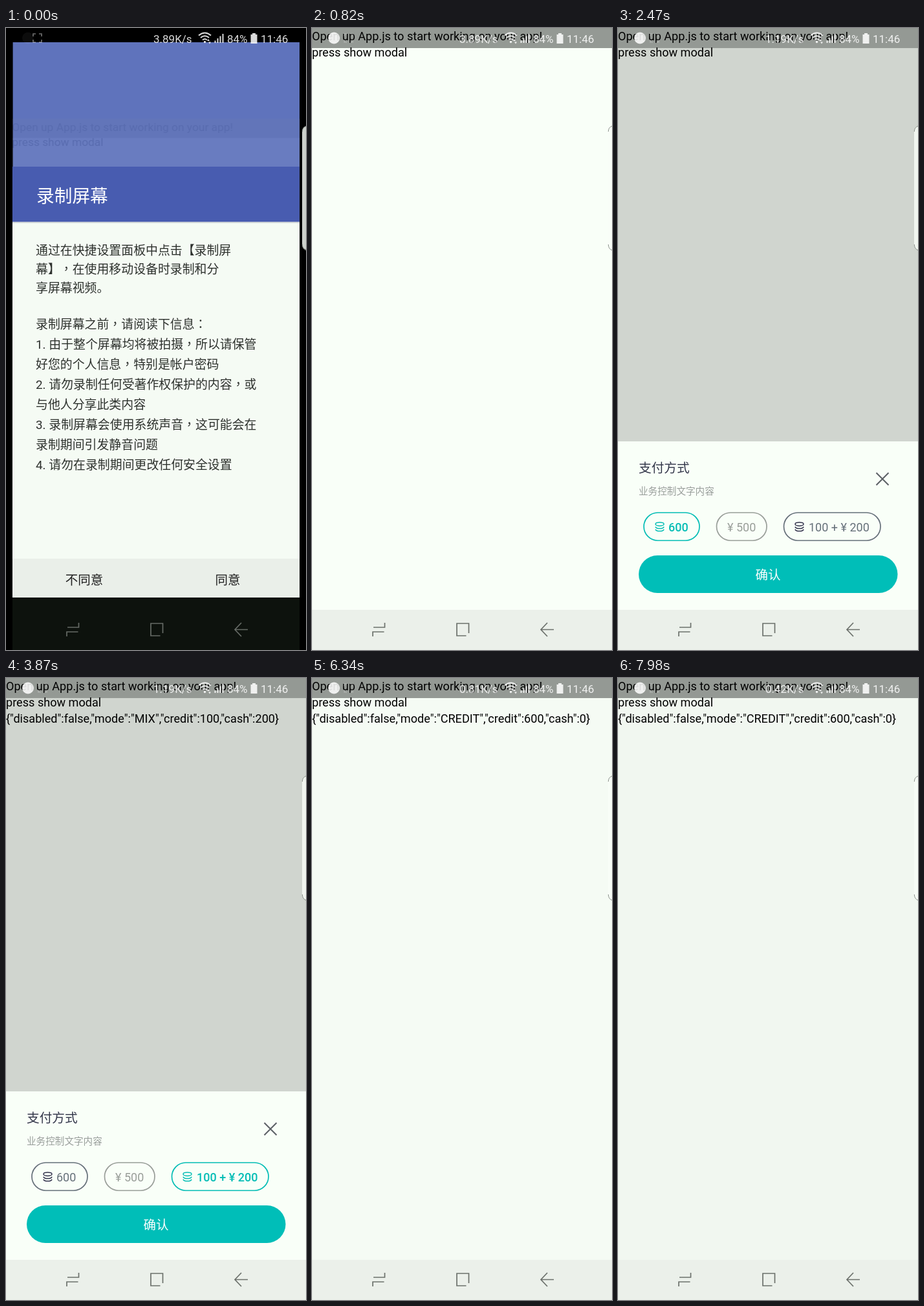
An HTML page for the animation above (8 s loop, 464 by 960 pixels).

```html
<!DOCTYPE html>
<html lang="zh-CN">
<head>
<meta charset="utf-8">
<style>
html, body { margin: 0; width: 100%; height: 100%; overflow: hidden; background: #000; }
svg { display: block; width: 464px; height: 960px; }
text { font-family: Roboto, "Noto Sans CJK SC", "Noto Sans CJK", sans-serif; white-space: pre; }
.line { fill: none; stroke-width: 1.7; }
.app { font-size: 18.1px; }
.status { font-size: 17px; fill: #fff; }
.body { font-size: 18.9px; fill: #1f231f; text-spacing-trim: space-all; font-feature-settings: "chws" 0, "halt" 0; }
.comma { font-family: "Noto Sans CJK TC", "Noto Sans CJK", sans-serif; }
.chip text { font-size: 18px; stroke: none; fill: currentColor; }
.chip { stroke: currentColor; color: #66707a; --icon: #30304a; }
.chip.off { color: #999e99; }
.chip.on { color: #04bdb5; --icon: #04bdb5; }
.chip.on text { font-weight: 500; }
.coins { stroke: var(--icon); stroke-width: 1.5; }
</style>
</head>
<body>
<svg viewBox="0 0 464 960">
  <defs>
    <g id="keys" class="line">
      <path d="M95 925H112.500V918M94 939V932H111.500"/>
      <path d="M242.500 934V919H224V938H238.500"/>
      <path d="M374 928.500H354.500M364 918L354 928.500L364 939"/>
    </g>
    <g id="coins" class="line coins">
      <ellipse cx="7.500" cy="3.200" rx="6.500" ry="2.700"/>
      <path d="M1 7.200C2 11 13 11 14 7.200M1 11.200C2 15 13 15 14 11.200"/>
    </g>
  </defs>
  <rect width="464" height="960"/>

  <g id="consent">
    <rect x="10.600" y="22" width="443.400" height="192" fill="#5f73bc"/>
    <rect x="10" y="214" width="444" height="86" fill="#3b51ab"/>
    <rect x="10" y="300" width="444" height="520" fill="#f5fbf4"/>
    <rect x="10" y="299" width="444" height="2" fill="#c6ccd2"/>
    <rect x="10" y="819" width="444" height="60" fill="#e9eee8"/>
    <text x="47" y="268.500" font-size="27.700" fill="#fff">录制屏幕</text>
    <g id="terms"></g>
    <g font-size="19.500" text-anchor="middle" fill="#111">
      <text x="121" y="858.500">不同意</text>
      <text x="343" y="858.500">同意</text>
    </g>
  </g>

  <g id="app">
    <rect width="464" height="960" fill="#f9fff8"/>
    <rect id="dim" y="31" width="464" height="867" fill="#000"/>
    <rect width="464" height="31" fill="#949994"/>
    <text class="app" x="0" y="19.300">Open up App.js to start working on your app!</text>
    <text class="app" x="0" y="44" id="link">press show modal</text>
    <text class="app" x="0" y="68.500" id="json"></text>
    <g id="sheet">
      <rect y="638" width="464" height="262" fill="#f9fff8"/>
      <text x="32" y="686" font-size="19.700" fill="#33364a">支付方式</text>
      <text x="32" y="720" font-size="14.600" fill="#999e9b">业务控制文字内容</text>
      <path class="line" d="M399.500 686.500L418.500 705.500M418.500 686.500L399.500 705.500" stroke="#5c6066" style="stroke-width:2"/>
      <g class="chip" id="credit">
        <rect class="line" x="40" y="748" width="86" height="43" rx="21.500"/>
        <use href="#coins" x="57" y="762.500"/>
        <text x="78" y="777">600</text>
      </g>
      <g class="chip off">
        <rect class="line" x="152.500" y="748" width="77.500" height="43" rx="21.500"/>
        <text x="169" y="777">¥ 500</text>
      </g>
      <g class="chip" id="mix">
        <rect class="line" x="256.500" y="748" width="149.500" height="43" rx="21.500"/>
        <use href="#coins" x="273" y="762.500"/>
        <text x="295" y="777">100 + ¥ 200</text>
      </g>
      <g id="confirm">
        <rect x="32" y="814" width="400.500" height="58" rx="29" fill="#00beb8"/>
        <text x="232" y="850.500" font-size="19.500" text-anchor="middle" fill="#fff">确认</text>
      </g>
    </g>
  </g>

  <g id="darkNav">
    <rect y="879" width="464" height="81"/>
    <rect x="10" y="879" width="444" height="81" fill="#0d120d"/>
    <use href="#keys" stroke="#666b66"/>
  </g>
  <g id="lightNav">
    <rect y="898" width="464" height="62" fill="#ebf0ea"/>
    <use href="#keys" stroke="#6c716c"/>
  </g>

  <g opacity=".86">
    <circle id="badge" cx="34" cy="15.500" r="9" fill="#fff"/>
    <path id="corners" class="line" stroke="#fff" d="M42 13V9H46M51 9H55V13M55 18V22H51M46 22H42V18"/>
    <text class="status" x="228" y="22.500" id="speed"></text>
    <g class="line" stroke="#fff" style="stroke-width:2">
      <path d="M298 11.500Q307.500 3.500 317 11.500M301 15Q307.500 9.500 314 15M304 18.500Q307.500 15.500 311 18.500"/>
      <path d="M323.500 23V19.500M327.500 23V16M331.500 23V12.500M335.500 23V9"/>
    </g>
    <circle cx="307.500" cy="21.500" r="1.700" fill="#fff"/>
    <path d="M311 20l2-3 2 3zM313 21.500h4l-2 3z" fill="#fff"/>
    <text class="status" x="342" y="22.500">84%</text>
    <path d="M381 8h5v2h2.500v14h-10V10h2.500z" fill="#fff"/>
    <text class="status" x="394" y="22.500">11:46</text>
  </g>

  <path d="M470 151Q458 151 458 161V333Q458 343 470 343Z" fill="#f9fef8" opacity=".82"/>
  <path class="line" d="M464 151.500Q458.500 153 458.300 160M464 343Q458.500 341 458.300 334" stroke="#8d938d" style="stroke-width:1"/>
  <circle id="finger" r="14.500" fill="#dfe3ec" fill-opacity=".45" stroke="#bcc4da" stroke-width="2"/>
</svg>
<script>
const LOOP = 8000;
const $ = id => document.getElementById(id);
const clamp = v => Math.max(0, Math.min(1, v));
const progress = (t, start, length) => clamp((t - start) / length);
const easeOut = p => 1 - (1 - p) ** 2;
const easeInOut = p => p < .5 ? 2 * p * p : 1 - 2 * (1 - p) ** 2;
const fade = (id, value) => $(id).setAttribute('opacity', value.toFixed(3));
const write = (id, value) => { if ($(id).textContent !== value) $(id).textContent = value; };

const terms = [
  [350, '通过在快捷设置面板中点击【录制屏'],
  [379, '幕】，在使用移动设备时录制和分'],
  [408, '享屏幕视频。'],
  [464, '录制屏幕之前，请阅读下信息：'],
  ...['1. 由于整个屏幕均将被拍摄，所以请保管', '好您的个人信息，特别是帐户密码',
    '2. 请勿录制任何受著作权保护的内容，或', '与他人分享此类内容',
    '3. 录制屏幕会使用系统声音，这可能会在', '录制期间引发静音问题',
    '4. 请勿在录制期间更改任何安全设置'].map((s, i) => [495 + 31 * i, s])
];
// Commas and colons sit centred in their cell, as in traditional typesetting.
const centreMarks = s => s.replace(/[，：]/g, '<tspan class="comma" lang="zh-TW">$&</tspan>');
$('terms').innerHTML = terms
  .map(([y, s]) => `<text class="body" x="46" y="${y}">${centreMarks(s)}</text>`).join('');

const touches = [
  { from: 1770, to: 2030, x: 55, y: 52, on: 'link' },
  { from: 3360, to: 3560, x: 330, y: 770, on: 'mix' },
  { from: 4820, to: 5100, x: 82, y: 770, on: 'credit' },
  { from: 5830, to: 6050, x: 232, y: 843, on: 'confirm' },
  { from: 7300, to: 7740, x: 55, y: 52, on: 'link' }
];
const MIX_AT = 3590, CREDIT_AT = 5130;
const OPEN_AT = 2150, CLOSE_AT = 6110, REOPEN_AT = 7885, SLIDE = 300;

const payload = (mode, credit, cash) => JSON.stringify({ disabled: false, mode, credit, cash });

function drawTouches(t) {
  const dimmed = { link: 0, mix: 0, credit: 0, confirm: 0 };
  for (const { from, to, on } of touches) {
    const press = progress(t, from, 120) * (1 - progress(t, to, 180));
    dimmed[on] = Math.max(dimmed[on], press);
  }
  for (const id in dimmed) fade(id, 1 - .78 * dimmed[id]);

  const active = touches.find(k => t >= k.from && t < k.to);
  fade('finger', active ? 1 : 0);
  if (active) {
    $('finger').setAttribute('cx', active.x);
    $('finger').setAttribute('cy', active.y);
  }
}

function draw(t) {
  const enter = easeOut(progress(t, 20, 360));
  const scale = .96 + .04 * enter;
  $('app').setAttribute('transform',
    `translate(${232 * (1 - scale)} ${140 * (1 - enter)}) scale(${scale})`);
  fade('app', .07 + .93 * enter);
  fade('consent', enter < 1 ? 1 : 0);
  fade('darkNav', 1 - enter);
  fade('lightNav', enter);
  fade('badge', .06 + .94 * enter);
  fade('corners', .5 - .25 * enter);
  $('corners').setAttribute('transform', `translate(${8 * enter} 0)`);

  const open = easeInOut(progress(t, OPEN_AT, SLIDE))
    - easeInOut(progress(t, CLOSE_AT, SLIDE))
    + easeInOut(progress(t, REOPEN_AT, SLIDE));
  fade('dim', .163 * open);
  $('sheet').setAttribute('transform', `translate(0 ${960 * (1 - open)})`);

  const mixed = t >= MIX_AT && t < CREDIT_AT;
  $('mix').setAttribute('class', mixed ? 'chip on' : 'chip');
  $('credit').setAttribute('class', mixed ? 'chip' : 'chip on');
  write('json', t < MIX_AT ? '' : mixed ? payload('MIX', 100, 200) : payload('CREDIT', 600, 0));
  write('speed', (t < 1580 ? '3.89' : t < 4630 ? '1.19' : t < 7630 ? '0.81' : '0.42') + 'K/s');
  drawTouches(t);
}

const start = performance.now();
function tick() {
  draw((performance.now() - start) % LOOP);
  requestAnimationFrame(tick);
}
draw(0);
requestAnimationFrame(tick);
</script>
</body>
</html>
```
